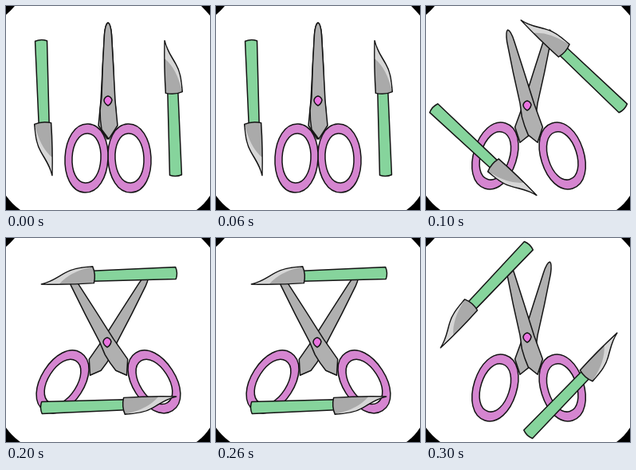
Recreate the animation shown at these times as an HTML page. Size 256 by 256 pixels, loop 400 ms.

```html
<!DOCTYPE html>
<html lang="en">
<head>
<meta charset="utf-8">
<title>Scissors and scalpels</title>
<style>
  html, body { margin: 0; height: 100%; overflow: hidden; background: #000; }
  svg { display: block; width: 100%; height: 100%; }
  .ink { stroke: #141414; stroke-width: 1.5; stroke-linejoin: round; stroke-linecap: round; }
</style>
</head>
<body>
<svg viewBox="0 0 256 256">
  <defs>
    <!-- Both halves are drawn around the screw. -->
    <path id="blade" fill="#b0b0b0" d="M0 -98 C3 -97 4 -90 4.5 -82 Q7 -40 9 0 L12 31 L1 48 L-8 36
      Q-10 24 -10 12 L-8 -5 Q-7 -45 -4.5 -84 Q-3 -97 0 -98Z"/>
    <path id="grip" fill="#d585d0" fill-rule="evenodd" transform="translate(27 72) rotate(-3)"
      d="M0 -43 C17 -43 27 -23 27 0 S17 43 0 43 S-27 23 -27 0 S-17 -43 0 -43Z
         M0 -31 C11 -31 18 -17 18 0 S11 31 0 31 S-18 17 -18 0 S-11 -31 0 -31Z"/>
    <!-- The scalpel points along x, from the end of its handle. -->
    <g id="scalpel">
      <path fill="#86d49c" d="M1 -7.5 Q50 -7 105 -6.5 L106 6.5 Q50 7 1 7.5 Q-2 0 1 -7.5Z"/>
      <path fill="#aaa" d="M104 -9 Q136 -10 170 -8 C158 -6 150 0 140 5 C129 11 118 11 105 12 Q101 2 104 -9Z"/>
      <path fill="#d6d6d6" stroke="none" d="M166 -7.5 C157 -6 149 -1 139.500 4.300 C129 10 118 10.300 107 11.200 Q134 6 147 -8.200Z"/>
    </g>
  </defs>

  <path fill="#fff" d="M11 0 H245 Q250 5 256 12 V238 Q249 249 239 256 H18 Q8 249 0 238 V11 Q6 6 11 0Z"/>

  <g class="ink">
    <use href="#blade" class="rear"/>
    <use href="#blade" class="front"/>
    <use href="#grip" class="front"/>
    <use href="#grip" class="rear"/>
    <path id="screw" fill="#ea74e0" d="M0 -6 Q4 -5 5 -1 Q4 4 0 6 Q-5 3 -5 -1 Q-4 -5 0 -6Z"/>
    <use href="#scalpel" class="knife"/>
    <use href="#scalpel" class="knife"/>
  </g>
</svg>
<script>
  const STEP = 100;
  // slack: how far the rear half slides; each knife: handle end x, y and heading in degrees.
  const poses = [
    { open: 0,    slack: 0, pivot: [128, 119], knives: [[44, 43, 88], [213, 213, 268]] },
    { open: 14.5, slack: 4, pivot: [127, 125], knives: [[9, 127.5, 43], [248, 129, 223.5]] },
    { open: 29.5, slack: 3, pivot: [127, 131], knives: [[44, 213, -2], [214, 44, 178]] },
    { open: 14.5, slack: 4, pivot: [127, 125], knives: [[127.5, 247, -46], [129.5, 9, 133.5]] }
  ];
  const all = selector => [...document.querySelectorAll(selector)];
  const place = (items, transform) =>
    items.forEach(item => item.setAttribute("transform", transform));

  const front = all(".front"), rear = all(".rear");
  const screw = all("#screw"), knives = all(".knife");

  function draw(time) {
    const pose = poses[Math.floor(time / STEP) % poses.length];
    const origin = `translate(${pose.pivot})`;
    place(front, `${origin} rotate(${-pose.open})`);
    place(rear, `${origin} translate(${pose.slack} 0) scale(-1 1) rotate(${-pose.open})`);
    place(screw, origin);
    pose.knives.forEach(([x, y, angle], i) =>
      place([knives[i]], `translate(${x} ${y}) rotate(${angle})`));
  }

  const start = performance.now();
  function tick() {
    draw(performance.now() - start);
    requestAnimationFrame(tick);
  }
  tick();
</script>
</body>
</html>
```
